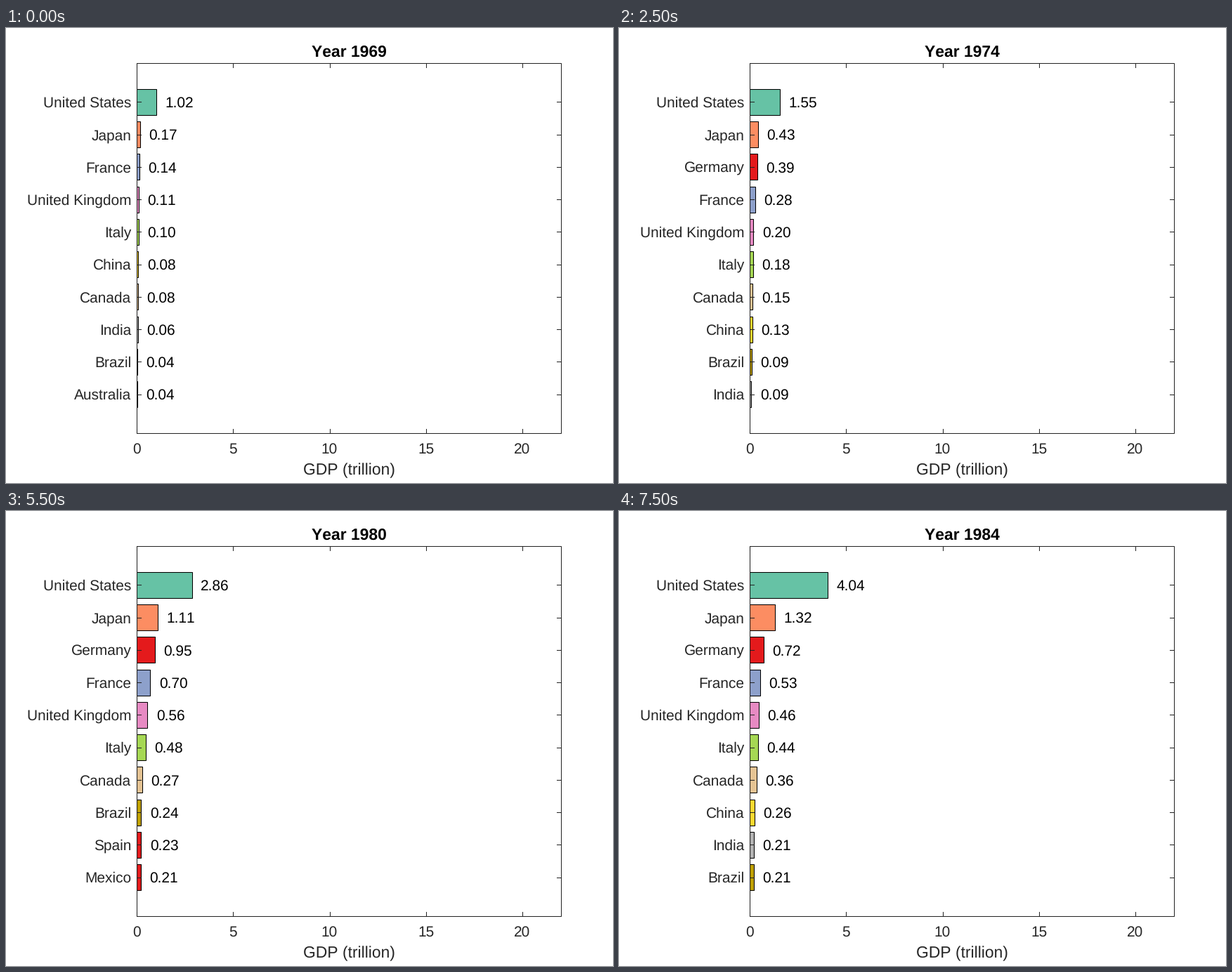
Write a matplotlib script that moves like this. It is 864 px wide and 648 px high and loops after 8000 ms.

```python
import numpy as np
import matplotlib.pyplot as plt
from matplotlib.animation import FuncAnimation
from matplotlib.patches import Rectangle

plt.rcParams.update({
    "font.family": "Liberation Sans",
    "text.kerning_factor": 6,  # plain advance widths
    "text.hinting": "none",
})

W, H, DPI = 864, 648, 150
LEFT, RIGHT, TOP, BOTTOM = 186.5, 790.5, 49.5, 576.5
UNIT = (RIGHT - LEFT) / 22
ROW = (BOTTOM - TOP) / 11.4
BAR = 0.8 * ROW
TICK = 6
DIGIT = 11.58
INK, RED = "#262626", "#e41a1c"
THIN = 0.5
FIRST, YEARS, TOP_N = 1969, 16, 10

# GDP in billions at a few key years; steady growth rates in between
KEYS = (1969, 1972, 1976, 1978, 1980, 1982, 1984)
GDP = {
    "United States": ("#66c2a5", (1020, 1279, 1878, 2357, 2862, 3344, 4041)),
    "Japan": ("#fc8d62", (172, 318, 586, 1014, 1106, 1134, 1318)),
    "Germany": (RED, (196, 300, 520, 740, 950, 774, 724)),
    "France": ("#8da0cb", (142, 204, 372, 507, 701, 584, 531)),
    "United Kingdom": ("#e78ac3", (113, 170, 233, 336, 564, 516, 461)),
    "Italy": ("#a6d854", (97, 144, 224, 314, 477, 427, 438)),
    "China": ("#ffd92f", (80, 114, 154, 149, 191, 206, 260)),
    "Canada": ("#e5c494", (78, 113, 207, 219, 274, 313, 356)),
    "India": ("#b3b3b3", (58, 71, 103, 137, 186, 201, 212)),
    "Brazil": ("#bfa000", (38, 58, 153, 201, 236, 282, 209)),
    "Spain": (RED, (36, 59, 119, 160, 233, 196, 172)),
    "Australia": (RED, (37, 52, 105, 118, 150, 194, 193)),
    "Netherlands": (RED, (34, 55, 109, 154, 182, 159, 144)),
    "Mexico": (RED, (32, 45, 89, 102, 206, 185, 184)),
}
JOINS = {"Germany": 1970}


def gdp(name, year):
    return np.exp(np.interp(year, KEYS, np.log(GDP[name][1]))) / 1000


def ranking(year):
    live = [(gdp(name, year), name) for name in GDP if year >= JOINS.get(name, FIRST)]
    return sorted(live, reverse=True)[:TOP_N]


fig = plt.figure(figsize=(W / DPI, H / DPI), dpi=DPI, facecolor="white")
ax = fig.add_axes([0, 0, 1, 1])
# the half pixel makes lines snap to the pixel whose centre they name
ax.set(xlim=(0.5, W + 0.5), ylim=(H - 0.5, -0.5))
ax.axis("off")


def label(x, y, s="", color=INK, size=10, ha="left", **kw):
    return ax.text(x + 0.5, y - 0.5, s, color=color, fontsize=size, ha=ha,
                   va="baseline", **kw)


def line(x0, y0, x1, y1):
    ax.plot([x0, x1], [y0, y1], color=INK, lw=THIN, zorder=3)


ax.add_patch(Rectangle((LEFT, TOP), RIGHT - LEFT, BOTTOM - TOP,
                       fill=False, ec=INK, lw=THIN, zorder=3))
for v in range(0, 21, 5):
    x = LEFT + v * UNIT
    line(x, TOP, x, TOP + TICK)
    line(x, BOTTOM, x, BOTTOM - TICK)
    label(x - 0.7 - DIGIT * len(str(v)) / 2, 606, str(v))
label(488, 636, "GDP (trillion)", size=11, ha="center")
title = label(488.5, 41, color="black", size=11, ha="center", weight="bold")

rows = []
for i in range(TOP_N):
    y = TOP + (1.2 + i) * ROW
    line(LEFT, y, LEFT + TICK, y)
    line(RIGHT, y, RIGHT - TICK, y)
    bar = ax.add_patch(Rectangle((LEFT, y - BAR / 2), 0, BAR, ec="black", lw=THIN, zorder=2))
    rows.append((bar, label(178.5, y + 8, ha="right"), label(LEFT, y + 8, color="black")))


def update(k):
    year = FIRST + k
    title.set_text(f"Year {year}")
    for (bar, name_text, value_text), (value, name) in zip(rows, ranking(year)):
        bar.set_width(value * UNIT)
        bar.set_facecolor(GDP[name][0])
        name_text.set_text(name)
        value_text.set_text(f"{value:.2f}")
        value_text.set_x(LEFT + value * UNIT + 12.5)
    return []


anim = FuncAnimation(fig, update, frames=YEARS, interval=500, repeat=True,
                     repeat_delay=0, blit=False)
plt.show()
```
